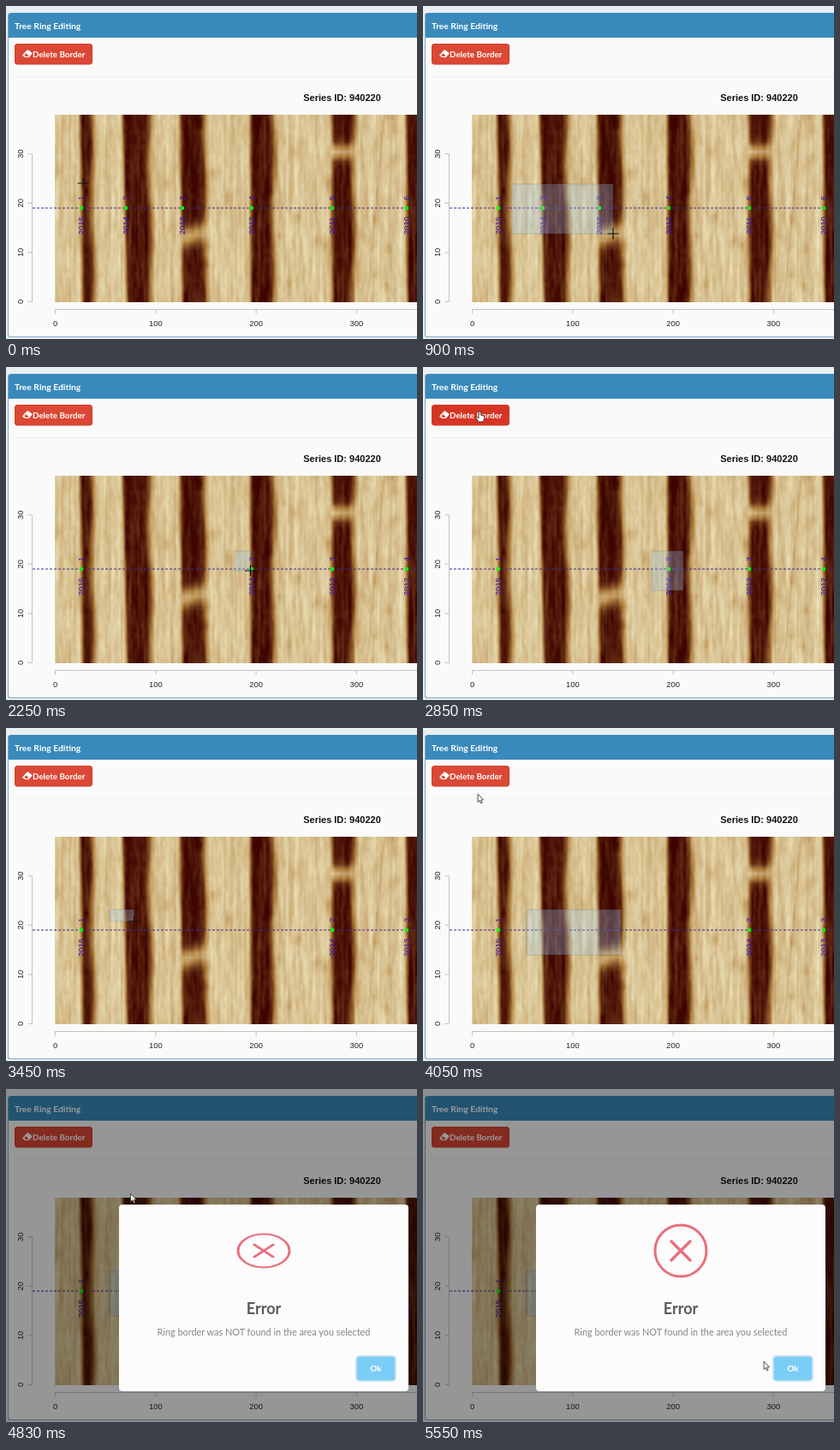
An HTML page with a canvas for the animation above (6630 ms loop, 480 px wide and 389 px high).

```html
<!DOCTYPE html>
<html lang="en">
<head>
<meta charset="utf-8">
<title>Tree Ring Editing</title>
<style>
html, body { margin: 0; width: 100%; height: 100%; overflow: hidden; background: #e9eef3; }
.stage { position: relative; width: 480px; height: 389px; max-height: 100%; overflow: hidden; }
.box { position: absolute; left: 2px; top: 8px; right: 0; height: 378px; background: #fafafa; border: 1px solid #7fa9c4; border-width: 0 0 1px 1px; border-radius: 3px 0 0 3px; }
.head { height: 29px; background: #398abb; border-radius: 3px 0 0 0; }
canvas { position: absolute; left: 57px; top: 127px; width: 423px; height: 219px; }
svg { position: absolute; left: 0; top: 0; }
text { font-family: "Liberation Sans", Arial, sans-serif; font-size: 9.4px; fill: #222; }
.ui { font-family: Lato, "Open Sans", sans-serif; font-weight: bold; fill: #fff; }
.mid { text-anchor: middle; }
#rings text { fill: #3210b4; }
</style>
</head>
<body>
<div class="stage">
<div class="box"><div class="head"></div></div>
<canvas id="wood" width="361" height="38"></canvas>
<svg width="480" height="389" viewBox="0 0 480 389">
  <text class="ui" x="10" y="27" style="font-size:10.3px">Tree Ring Editing</text>
  <rect id="button" x="10.5" y="44.5" width="90" height="23.5" rx="2.5" stroke="#d13b29"/>
  <path d="M19.5 57l5-5.4q.8-.7 1.6 0l4 3q.8.7 0 1.6l-3.4 3.8h-4.5l-2.3-1.6q-1-.7-.4-1.4z" fill="#fff"/>
  <path d="M21.3 57.2l1.9-2 3.2 2.5-1.3 1.3h-1.8z" fill="#db4835"/>
  <text class="ui" x="31" y="59.6" style="font-size:9.8px">Delete Border</text>
  <path d="M10 82.5H480" stroke="#eee"/>
  <text class="mid" x="392.5" y="111" style="font-size:11px;font-weight:bold;fill:#111">Series ID: 940220</text>
  <g id="axes" class="mid"><path d="M30.5 173V345.5M57 354.5H480" stroke="#c3c3bb"/></g>
  <path d="M31 236H480" stroke="#3a2a94" stroke-dasharray="3 2"/>
  <g id="rings" class="mid"></g>
  <rect id="brush" fill="#9cf" fill-opacity=".28" stroke="#036" stroke-opacity=".15"/>
  <rect id="shade" width="480" height="389"/>
  <g id="dialog" class="mid">
    <rect x="132" y="135" width="338" height="218" rx="4" fill="#fcfcfc"/>
    <g id="icon" fill="none" stroke="#e8707f" stroke-width="3">
      <circle r="30"/>
      <path d="M-11-11L11 11M11-11L-11 11" stroke-width="3.5" stroke-linecap="round"/>
    </g>
    <text class="ui" x="301" y="263" style="font-size:18px;fill:#5b5b5b">Error</text>
    <text class="ui" x="301" y="288" style="font-size:10.9px;font-weight:normal;fill:#858585">Ring border was NOT found in the area you selected</text>
    <rect x="409" y="312" width="46" height="29" rx="4" fill="#7acdf5" stroke="#c4e3f1" stroke-width="2"/>
    <text class="ui" x="432" y="330" style="font-size:10.2px">Ok</text>
  </g>
  <g id="cursor">
    <path id="cross" d="M-6.5 0H6.5M0-6.5V6.5" stroke="#111" stroke-width="1.2"/>
    <path id="arrow" d="M0 0V9.5L2.2 7.6 3.7 11 5.2 10.3 3.8 7H6.6Z" fill="#f4f4f4" stroke="#333" stroke-width=".8"/>
    <path id="hand" d="M-1 1Q0-.5 1 1V5L5.5 6V10L4 13H-1L-4 8.5Q-4 7-2.6 7.6L-1 9Z" fill="#fff" stroke="#222" stroke-width=".8"/>
  </g>
</svg>
</div>
<script>
const $ = id => document.getElementById(id);
const clamp = v => Math.max(0, Math.min(1, v));
const mix = (a, b, k) => a + (b - a) * k;
const smooth = (a, b, v) => { const k = clamp((v - a) / (b - a)); return k * k * (3 - 2 * k); };
const bump = (v, c, r) => Math.exp(-(((v - c) / r) ** 2));
const set = (el, attrs) => { for (const k in attrs) el.setAttribute(k, attrs[k]); };

let seed = 7;
const random = () => (seed = seed * 16807 % 2147483647) / 2147483647;

// Dark bands: left edge, width, lean from top to bottom
const bands = [[87, 12, 3], [137, 29, 5], [204, 27, 3], [286, 25, 1], [381, 24, 1], [468, 30, 2]];
const cream = [236, 226, 186], gold = [176, 128, 62], dark = [62, 5, 0];

const tint = v => v < .45
  ? cream.map((c, i) => mix(c, gold[i], clamp(v / .45)))
  : gold.map((c, i) => mix(c, dark[i], clamp((v - .45) / .5)));

function darkness(x, y) {
  const k = y / 219;
  return Math.max(...bands.map(([left, width, lean], i) => {
    const l = left + lean * k, r = left + width + lean * k * .5 + 1.5 * Math.sin(y / 23 + i * 2);
    let d = smooth(l - 4, l + 3, x) * (1 - smooth(r - 5, r + 8, x));
    if (i == 2) d *= 1 - .8 * bump(y, 144 - (x - left) * .25, 11);
    if (i == 4) d *= 1 - .85 * bump(y, 43, 9);
    return d;
  }));
}

function paintWood() {
  const ctx = $("wood").getContext("2d"), img = ctx.createImageData(361, 38);
  const noise = Array.from({ length: 361 }, () => random() - .5);
  const grain = noise.map(() => random() - .5);
  const spots = Array.from({ length: 30 }, () => ({ x: 57 + random() * 423, y: random() * 219, r: 3 + random() * 3 }));
  for (let row = 0; row < 38; row++) {
    for (let i = 0; i < 361; i++) noise[i] = noise[i] * .75 + (random() - .5) * .75;
    for (let i = 0; i < 361; i++) {
      const x = 57 + (i + .5) * 1.173, y = (row + .5) * 5.76;
      const streak = ((noise[i - 1] || 0) + noise[i] + (noise[i + 1] || 0)) / 3;
      const d = darkness(x, y);
      let v = .14 + streak * .22 + grain[i] * .06 + d * .74;
      for (const s of spots) v += .13 * bump(x, s.x, s.r) * bump(y, s.y, s.r * 1.5);
      v += .12 * bump(x, 442 - y * .09, 1.3) * (1 - d);
      img.data.set([...tint(v), 255], (row * 361 + i) * 4);
    }
  }
  ctx.putImageData(img, 0, 0);
}

const upright = (x, y, s) => `<text transform="translate(${x} ${y}) rotate(-90)">${s}</text>`;

function drawAxes() {
  for (let i = 0; i < 4; i++) {
    const x = 57.5 + i * 117.3, y = 345.5 - i * 57.6;
    $("axes").innerHTML += `<path d="M30.5 ${y}h-5M${x} 354.5v5" stroke="#c3c3bb"/>` +
      upright(19.5, y, i * 10) + `<text x="${x}" y="374">${i * 100}</text>`;
  }
}

function drawRings(t) {
  const gone = t < 1800 ? [] : t < 3150 ? [140, 206] : [140, 206, 287];
  const left = [88, 140, 206, 287, 381, 468].filter(x => !gone.includes(x));
  $("rings").innerHTML = left.map((x, i) =>
    upright(x + 3.2, 224.5, i + 1) + upright(x + 3.2, 256.5, 2015 - i) +
    `<circle cx="${x}" cy="236" r="2.2" fill="#0f0"/>`).join("");
}

// Pointer path: time, x, y
const path = [
  [0, 90, 207], [300, 104, 208], [900, 222, 266], [1450, 67, 55], [1650, 88, 84],
  [2100, 267, 215], [2400, 304, 261], [2850, 66, 51], [3300, 121, 212], [3750, 231, 265],
  [4050, 64, 77], [4300, 67, 55], [4500, 68, 62], [5370, 350, 281], [5550, 398, 318]
];
function pointer(t) {
  const i = Math.max(1, path.findIndex(p => p[0] >= t)), a = path[i - 1], b = path[i];
  const k = smooth(a[0], b[0], t);
  return [mix(a[1], b[1], k), mix(a[2], b[2], k)];
}

// Selections: drag start, drag end, removal
const drags = [[300, 900, 1800], [2100, 2400, 3150], [3300, 3750, 6630]];
function drawBrush(t) {
  const drag = drags.find(d => t > d[0] && t < d[2]);
  $("brush").style.display = drag ? "" : "none";
  if (!drag) return;
  const [x, y] = pointer(drag[0]), [x2, y2] = pointer(Math.min(t, drag[1]));
  set($("brush"), { x, y, width: x2 - x, height: y2 - y });
}

function drawCursor(t) {
  const [x, y] = pointer(t);
  const kind = t >= 4500 ? "arrow" : y > 127 ? "cross" : y > 44 && y < 68 ? "hand" : "arrow";
  for (const id of ["cross", "arrow", "hand"]) $(id).style.display = id == kind ? "" : "none";
  set($("cursor"), { transform: `translate(${x} ${y})` });
  const hot = kind == "hand" || t > 1450 && t < 1800;
  set($("button"), { fill: hot ? "#d63524" : "#db4835" });
}

function drawDialog(t) {
  const k = smooth(4500, 4750, t), s = mix(.7, 1, k);
  set($("shade"), { opacity: .4 * clamp((t - 4475) / 300) });
  set($("dialog"), { opacity: k, transform: `translate(301 244) scale(${s}) translate(-301 -244)` });
  set($("icon"), { transform: `translate(301 189) scale(1 ${smooth(4500, 5000, t)})` });
}

let last = -1;
function frame(now) {
  const ms = now % 6630;
  const t = ms < 5370 ? Math.floor(ms / 150) * 150 : ms < 5550 ? 5370 : 5550;
  if (t != last) [drawRings, drawBrush, drawCursor, drawDialog].forEach(draw => draw(t));
  last = t;
}

paintWood();
drawAxes();
const start = performance.now();
(function tick() {
  frame(performance.now() - start);
  requestAnimationFrame(tick);
})();
</script>
</body>
</html>
```
